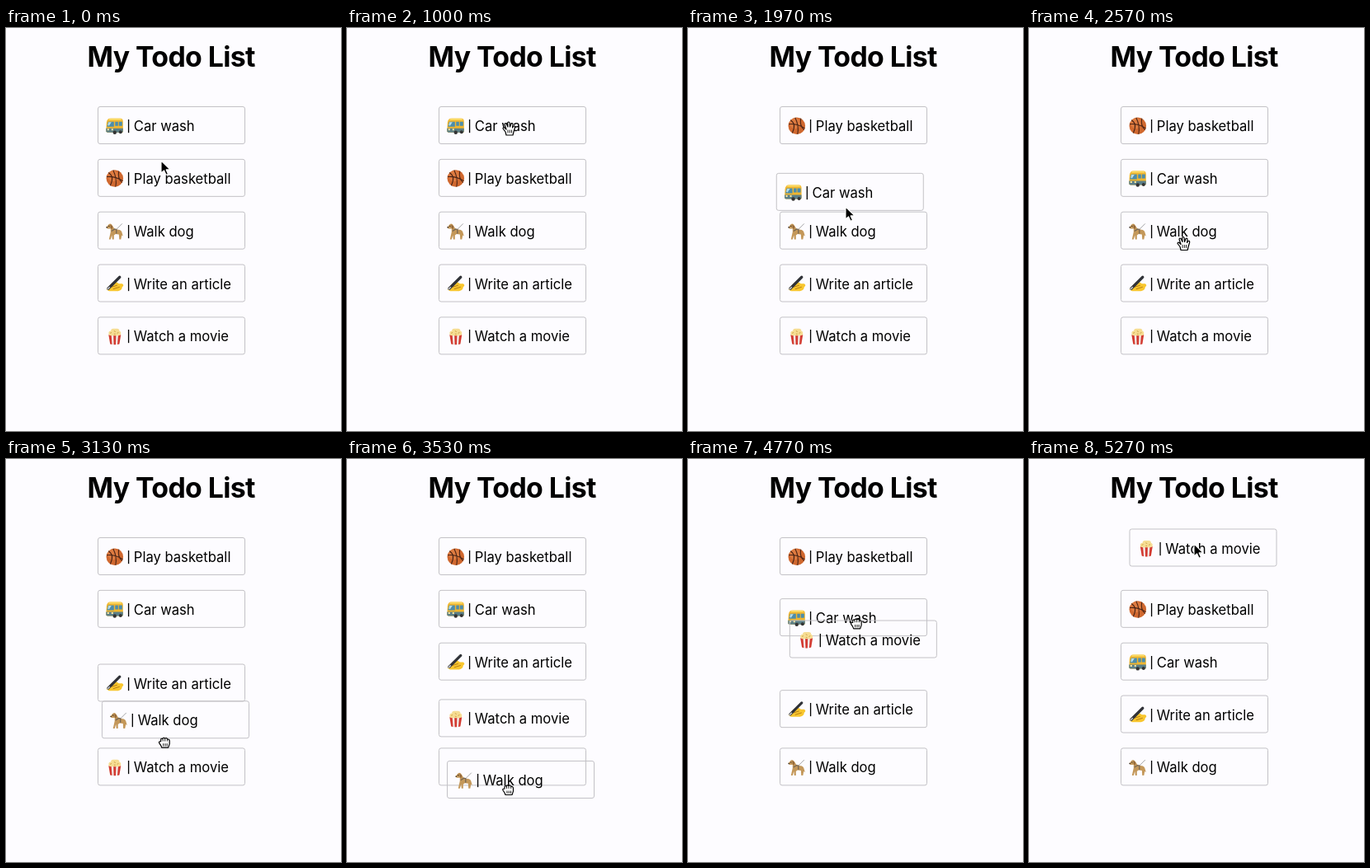
These frames come from a looping animation (406 px wide and 489 px high, 5310 ms). An HTML page:

```html
<!DOCTYPE html>
<html lang="en">
<head>
<meta charset="utf-8">
<title>My Todo List</title>
<style>
html, body { margin: 0; width: 100%; height: 100%; overflow: hidden; background: #fdfcff; }
svg { display: block; font-family: Inter, Roboto, sans-serif; }
text { font-size: 16.6px; }
.title { font-size: 33.8px; font-weight: 700; letter-spacing: -.6px; text-anchor: middle; }
.bar { font-size: 13.5px; font-weight: 500; text-anchor: middle; }
.box { fill: none; stroke: #c3c2c6; }
#cursor path { stroke-linejoin: round; stroke-linecap: round; }
</style>
</head>
<body>
<svg width="406" height="489" viewBox="0 0 406 489">
  <defs>
    <g id="bus">
      <path d="M-10.500 7L-10-4Q-9-9-6-9H7Q10-9 10-5V7Q10 8 9 8H-9Z" fill="#f0b62f"/>
      <path d="M-8-7Q-7-9-5-9H7L9-7Z" fill="#fbdc68"/>
      <path d="M-10.500 3H10V7L9 8H-9L-10.500 7Z" fill="#5b7f88"/>
      <path d="M-9.500 1L-8-5H-1V1ZM.5 0V-5H4V0ZM5 0V-5H9V0Z" fill="#4c8dab"/>
      <path d="M-8.500-1L-7.500-4.500H-4L-7 0Z" fill="#b9dce7"/>
      <path d="M-9 4.500H-7M-4 4.500H-2" stroke="#ffe9a0" stroke-width="2"/>
      <circle cx="0" cy="8" r="2.200" fill="#333"/><circle cx="7" cy="7.500" r="2" fill="#333"/>
    </g>
    <g id="ball">
      <circle r="10.300" fill="#d0682f"/>
      <circle cx="-2" cy="-3" r="6.500" fill="#e8884c" opacity=".6"/>
      <path d="M-9.800-2Q0-3 9.800 3M-2-10Q3 0 1 10.200M-7.500-7Q0-2-5.500 8.700M5-9Q3 0 9 5" fill="none" stroke="#4b2415" stroke-width="1.100"/>
    </g>
    <g id="dog">
      <path d="M2-2L9-9" stroke="#a5a5a8"/>
      <path d="M-10-5L-7-8.500Q-4-10-2.500-6L0-2.500L6-1.500Q8-1 8.500 1L10 6L8.500 5L7.500 10H5.500L5 4L1 3.500L-1 5V10H-3L-3.500 5L-5 10H-7L-5 1V-3L-9-3Z" fill="#c4985a"/>
      <path d="M-5.500-8L-2.500-6L-3.500-2L-5-4Z" fill="#94683a"/>
      <path d="M-4 0L0-2.500L2-2V3" fill="none" stroke="#716353" stroke-width="1.200"/>
      <circle cx="-7" cy="-6" r=".7" fill="#2c2119"/><circle cx="-9.600" cy="-4.500" r=".8" fill="#2c2119"/>
    </g>
    <g id="write">
      <path d="M-10 7L-5 1Q-2-3 2-2L5 0L9 0Q12 2 9 4Q9 8 4 9H-7Z" fill="#f8c62e"/>
      <path d="M-4 4L3 2M-2 6.500L6 4" stroke="#b97f16"/>
      <path d="M-8 6L6-8" stroke="#303238" stroke-width="3.200" stroke-linecap="round"/>
      <path d="M-9 7L-6 4" stroke="#c9cbd0" stroke-width="1.500"/>
    </g>
    <g id="corn" transform="scale(.93)">
      <path d="M-8-2H8L6 10Q0 12-6 10Z" fill="#f3eeea"/>
      <path d="M-8-2H-4.500L-3.500 10.700L-6 10ZM-1.700-2H1.700L1.300 11H-1.300ZM4.500-2H8L6 10L3.500 10.700Z" fill="#d33a31"/>
      <path d="M-5-4H5M-2-7H3" stroke="#f6dd93" stroke-width="6" stroke-linecap="round"/>
      <path d="M-6-4L-4-5M-1-7L1-6M3-4L5-5M-1-3H1" stroke="#cb9c43"/>
    </g>
  </defs>
  <text class="title" x="200.200" y="47">My Todo List</text>
  <g id="ghost"></g>
  <g id="cards"></g>
  <g id="cursor">
    <path id="arrow" transform="translate(-1 -2)" d="M0 0V15L3.500 11.800L6 17.300L8.500 16.200L6.100 10.900H11Z" stroke="#fff" stroke-width="1.100"/>
    <g id="open" fill="#fff" stroke="#000" stroke-width="1.200">
      <path d="M-3 8L-4 4L-7 0Q-7-2-5-1L-3 1L-5-5Q-5-7-3-6L-1-2L-1.500-7Q0-9 1-7L1.500-2L3-6Q5-7 5-5L4.500-1L6-3Q8-4 7.500-1L6 4L5 8Z"/>
      <path d="M-1 2V5M1.300 2V5M3.500 2V5" stroke-width=".9"/>
    </g>
    <g id="fist" fill="#fff" stroke="#000" stroke-width="1.200">
      <path d="M-3 6.500L-4 4L-6 1Q-7-1-4-1V-3Q-4-5-2-4Q-1-6 1-4.500Q3-6 4-3.500Q6.500-4 6.500-1V2L5 6.500Z"/>
      <path d="M-1.500-3.500V-1.500M1-4V-1.500M3.700-3.500V-1.500M-1 2V4.500M1.300 2V4.500M3.500 2V4.500" stroke-width=".9"/>
    </g>
  </g>
</svg>
<script>
const LOOP = 5310, LEFT = 111, TOP = 95, PITCH = 63.85;
const LAG = 50, SHIFT = 250, SETTLE = 260, HOVER = 260;

const todos = [
  ['bus', 'Car wash'], ['ball', 'Play basketball'], ['dog', 'Walk dog'],
  ['write', 'Write an article'], ['corn', 'Watch a movie']
];

// The pointer goes to `from`, carries the card to `to`, then lets go;
// the card trails it to `spot`, and a neighbour gives way at each swap.
const drags = [
  { card: 0, reach: 300, grab: 1090, stop: 1850, drop: 1900, swaps: [1540],
    from: [196, 122], to: [192, 219], spot: [103, 191], sway: 0 },
  { card: 2, reach: 2150, grab: 2690, stop: 3480, drop: 3900, swaps: [3040, 3350],
    from: [187, 262], to: [195, 401], spot: [121, 366], sway: 0 },
  { card: 4, reach: 3900, grab: 4390, stop: 5100, drop: 5265, swaps: [4600, 4750, 4940],
    from: [207, 317], to: [201, 105], spot: [122, 84], sway: 7 }
];

const $ = id => document.getElementById(id);
const clamp = u => Math.min(1, Math.max(0, u));
const smooth = (t, a, b) => { const u = clamp((t - a) / (b - a)); return u * u * (3 - 2 * u); };
const easeOut = (t, start, span) => 1 - (1 - clamp((t - start) / span)) ** 2;
const mix = (a, b, u) => a.map((v, i) => v + (b[i] - v) * u);
const home = i => [LEFT, TOP + PITCH * i];
const move = (node, [x, y]) => node.setAttribute('transform', `translate(${x} ${y})`);

function layout(t) {
  const order = todos.map((_, i) => i), spots = order.map(home);
  for (const d of drags) {
    if (t < d.grab) break;
    let place = order.indexOf(d.card);
    const start = home(place), dir = Math.sign(d.spot[1] - start[1]);
    for (const time of d.swaps) {
      const other = order[place + dir];
      spots[other][1] -= dir * PITCH * easeOut(t, time, SHIFT);
      order[place] = other;
      order[place += dir] = d.card;
    }
    const held = smooth(t, d.grab + LAG, d.stop + LAG);
    const carried = mix(start, d.spot, held);
    carried[0] += d.sway * Math.sin(Math.PI * held);
    spots[d.card] = mix(carried, home(place), easeOut(t, d.drop, SETTLE));
  }
  return spots;
}

function pointer(t) {
  let spot = [189, 163], shape = 'arrow';
  for (const d of drags) {
    spot = mix(spot, d.from, smooth(t, d.reach, d.grab - 90));
    spot = mix(spot, d.to, smooth(t, d.grab, d.stop));
    if (t >= d.grab - HOVER && t < d.drop) shape = t < d.grab ? 'open' : 'fist';
  }
  return { spot, shape };
}

const box = '<rect class="box" x=".5" y=".5" width="178" height="45" rx="2.5"/>';
$('cards').innerHTML = todos.map(([icon, label]) => `<g>${box}
  <use href="#${icon}" x="20.8" y="23.7"/>
  <text class="bar" x="37.5" y="29">|</text>
  <text x="43.8" y="30">${label}</text></g>`).join('');
$('ghost').innerHTML = box;
move($('ghost'), home(4));

function draw() {
  const t = performance.now() % LOOP;
  layout(t).forEach((spot, i) => move($('cards').children[i], spot));
  const { spot, shape } = pointer(t);
  move($('cursor'), spot);
  for (const node of $('cursor').children) node.style.display = node.id === shape ? '' : 'none';
  // The emptied last slot keeps its outline until the dog card settles there
  const { swaps, drop } = drags[1];
  $('ghost').style.display = t >= swaps[1] && t < drop + SETTLE ? '' : 'none';
  requestAnimationFrame(draw);
}
draw();
</script>
</body>
</html>
```
